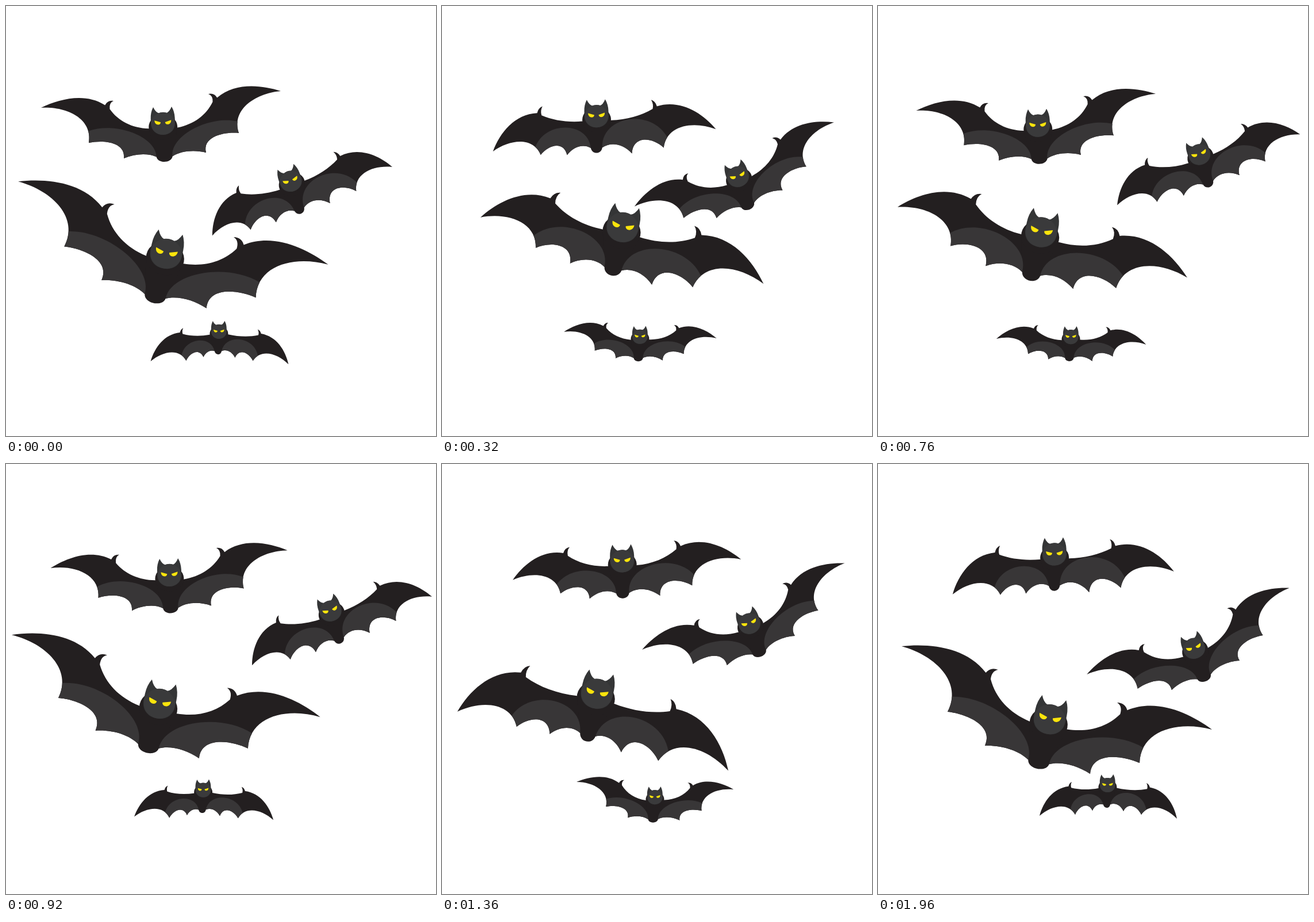
An HTML page with a canvas for the animation above (2000 ms loop, 748 by 748 pixels).

```html
<!DOCTYPE html>
<html lang="en">
<head>
<meta charset="utf-8">
<title>Bats</title>
<style>
  html, body { margin: 0; width: 100%; height: 100%; overflow: hidden; background: #fff; }
  canvas { display: block; }
</style>
</head>
<body>
<canvas id="stage" width="748" height="748"></canvas>
<script>
const ctx = document.getElementById('stage').getContext('2d');
const LOOP = 2000, STEP = 40;
const DARK = '#231f20', SKIN = '#383637', HEAD = '#343536', FACE = '#3a3a3b', EYE = '#fbe40c';
const TIMES = [0, 160, 520, 760, 1120, 1640, 1960];

// Wing joints are offsets from the bottom of the body: [wing tip, thumb, outer point, inner point].
// Each bat has a raised and a lowered pose, and a path with a bob that follows the beat.
const bats = [
  {
    size: 1, tilt: -2, period: 800, top: 0, bob: 24,
    x: [276, 268, 276, 281, 296, 328, 307], y: [271, 275, 277, 275, 247, 254, 244],
    head: [[-4, -95.5], [-1, -92.5]],
    left: [[[-215, -94], [-89, -106], [-132, -33], [-71, -6]], [[-176, 9], [-95, -78], [-93, 8], [-49, 5]]],
    right: [[[202, -123], [76, -118], [129, -50], [72, -16]], [[208, -31], [97, -89], [115, -4], [60, 3]]]
  },
  {
    size: 0.92, tilt: -20, period: 800, top: 460, bob: 20,
    x: [513, 517, 561, 577, 581, 532, 570], y: [380, 371.5, 341.6, 331.5, 334, 348, 380],
    head: [[-29.5, -82.5], [-26.5, -81.5]],
    left: [[[-213, -18], [-106, -67], [-122, 11], [-61, 15]], [[-150, 42], [-108, -48], [-85, 29], [-42, 15]]],
    right: [[[144, -172], [35, -129], [100, -85], [60, -38]], [[160, -75], [58, -106], [96, -36], [50, -17]]]
  },
  {
    size: 1.33, tilt: 12, period: 960, top: 40, bob: 35,
    x: [257, 277, 301, 264, 233, 280, 277], y: [517, 504.5, 477, 493, 514.5, 508, 530],
    head: [[29.5, -123.5], [25.5, -120]],
    left: [[[-236, -213], [-68, -172], [-156, -99], [-91, -40]], [[-222, -18], [-104, -123], [-114, -10], [-58, -7]]],
    right: [[[304, -68], [139, -115], [178, -10], [92, 9]], [[235, 76], [148, -65], [114, 43], [54, 21]]]
  },
  {
    size: 0.64, tilt: -1, period: 960, top: 520, bob: 20,
    x: [369, 358, 326, 333, 354, 382, 398], y: [625.6, 624.5, 625, 626.7, 623.5, 626.8, 618],
    head: [[3, -63], [1, -58]],
    left: [[[-135, -80], [-49, -77], [-85, -32], [-46, -10]], [[-117, 14], [-61, -45], [-55, 12], [-25, 5]]],
    right: [[[142, -66], [59, -72], [87, -24], [48, -5]], [[122, 19], [69, -43], [60, 12], [29, 6]]]
  }
];

const mix = (a, b, k) => a + (b - a) * k;
const mixPt = (a, b, k) => [mix(a[0], b[0], k), mix(a[1], b[1], k)];
const add = (a, b) => [a[0] + b[0], a[1] + b[1]];

// Smooth curve through the values at TIMES.
function track(v, t) {
  const last = TIMES.length - 1;
  const slope = (a, b) => (v[b] - v[a]) / (TIMES[b] - TIMES[a]);
  const tangent = i => {
    if (i === 0) return slope(0, 1);
    if (i === last) return slope(last - 1, last);
    const d0 = TIMES[i] - TIMES[i - 1], d1 = TIMES[i + 1] - TIMES[i];
    return (slope(i - 1, i) * d1 + slope(i, i + 1) * d0) / (d0 + d1);
  };
  let i = 0;
  while (i < last - 1 && t > TIMES[i + 1]) i++;
  const d = TIMES[i + 1] - TIMES[i], u = (t - TIMES[i]) / d, w = 1 - u;
  return v[i] * w * w * (1 + 2 * u) + v[i + 1] * u * u * (3 - 2 * u)
    + d * u * w * (tangent(i) * w - tangent(i + 1) * u);
}

// Cubic from p to q; its handles are given along and across the chord.
function bow(p, q, side, a1, b1, a2, b2) {
  const dx = q[0] - p[0], dy = q[1] - p[1];
  const at = (a, b) => [p[0] + dx * a + side * dy * b, p[1] + dy * a - side * dx * b];
  return [p, at(a1, b1), at(a2, b2), q];
}

// The part of a cubic after u.
function tail(c, u) {
  const ab = mixPt(c[0], c[1], u), bc = mixPt(c[1], c[2], u), cd = mixPt(c[2], c[3], u);
  const abc = mixPt(ab, bc, u), bcd = mixPt(bc, cd, u);
  return [mixPt(abc, bcd, u), bcd, cd, c[3]];
}

const trace = (...curves) => curves.forEach(c => ctx.bezierCurveTo(...c[1], ...c[2], ...c[3]));

function fill(color, draw) {
  ctx.fillStyle = color;
  ctx.beginPath();
  draw();
  ctx.closePath();
  ctx.fill();
}

function drawWing(poses, side, p, shoulder, hip, turn) {
  const [tip, thumb, outer, inner] = poses[0].map((pt, i) => mixPt(pt, poses[1][i], p));
  const near = (up, down) => {
    const o = mixPt(up, down, p);
    return add(thumb, turn([o[0] * side, o[1]]));
  };
  const rootIn = near([-7, 14], [-1.5, 16]), rootOut = near([-15, 7], [-9, 12]);
  const hookIn = near([-8, 3], [-4, 8]), hookOut = near([-10, -2], [-7, 3]);

  const sag = mix(0.16, 0.07, p);
  const arm = bow(shoulder, rootIn, side, 0.35, sag, 0.7, sag);
  const crest = bow(rootOut, tip, side, 0.3, -mix(0.21, 0.24, p), 0.7, -mix(0.13, 0.17, p));
  const sweep = bow(tip, outer, side, 0.35, 0.29, 0.82, 0.36);
  const scallop = bow(outer, inner, side, 0.3, mix(0.22, 0.42, p), 0.87, mix(0.42, 0.56, p));
  const b = mix(0.13, 0.27, p);
  const hem = bow(inner, hip, side, 0.35, b, 0.75, b);

  fill(DARK, () => {
    ctx.moveTo(...shoulder);
    trace(arm);
    ctx.quadraticCurveTo(...hookIn, ...thumb);
    ctx.quadraticCurveTo(...hookOut, ...rootOut);
    trace(crest, sweep, scallop, hem);
    ctx.lineTo(...mixPt(add(hip, turn([12 * side, 0])), add(shoulder, turn([20 * side, 0])), 0.5));
  });

  const edge = tail(sweep, 0.82);
  const arch = mix(0.26, 0.51, p);
  const dome = bow(hip, edge[0], side, mix(0.1, 0.05, p), -arch, mix(0.7, 0.85, p), -arch);
  return () => fill(SKIN, () => {
    ctx.moveTo(...edge[0]);
    trace(edge, scallop, hem, dome);
  });
}

function drawHead() {
  fill(DARK, () => ctx.ellipse(0, 35, 25, 22, 0, 0, 7));
  fill(HEAD, () => {
    ctx.moveTo(-16, 0);
    ctx.quadraticCurveTo(-12, 9, -7, 10.5);
    ctx.quadraticCurveTo(0, 8, 7, 10.5);
    ctx.quadraticCurveTo(12, 9, 16, 0);
    ctx.quadraticCurveTo(21, 9, 21, 20);
    ctx.lineTo(21, 28);
    ctx.bezierCurveTo(21, 41, 12, 48.5, 0, 48.5);
    ctx.bezierCurveTo(-12, 48.5, -21, 41, -21, 28);
    ctx.lineTo(-21, 20);
    ctx.quadraticCurveTo(-21, 9, -16, 0);
  });
  fill(FACE, () => ctx.ellipse(0, 29, 20.5, 19.5, 0, 0, 7));
  for (const s of [-1, 1]) {
    fill(EYE, () => {
      ctx.moveTo(14.5 * s, 23.3);
      ctx.lineTo(3.8 * s, 26.6);
      ctx.bezierCurveTo(4 * s, 32.5, 14.5 * s, 32.5, 14.5 * s, 23.3);
    });
  }
}

function drawBat(bat, t) {
  const beat = (1 - Math.cos((t - bat.top) / bat.period * 2 * Math.PI)) / 2;
  const p = Math.pow(beat, 1.2);
  const angle = bat.tilt * Math.PI / 180;
  const cos = Math.cos(angle) * bat.size, sin = Math.sin(angle) * bat.size;
  const turn = ([x, y]) => [x * cos - y * sin, x * sin + y * cos];

  ctx.save();
  ctx.translate(track(bat.x, t), track(bat.y, t) - bat.bob * p);

  const head = mixPt(bat.head[0], bat.head[1], p);
  const shoulder = s => add(head, turn([25 * s, 37]));
  const w = mix(14, 9.5, p);
  const hip = s => turn([w * s, -9]);

  const skins = [
    drawWing(bat.left, 1, p, shoulder(-1), hip(-1), turn),
    drawWing(bat.right, -1, p, shoulder(1), hip(1), turn)
  ];
  fill(DARK, () => {
    ctx.moveTo(...shoulder(-1));
    ctx.lineTo(...hip(-1));
    ctx.bezierCurveTo(...turn([2 - w, 3]), ...turn([w - 2, 3]), ...hip(1));
    ctx.lineTo(...shoulder(1));
  });
  skins.forEach(draw => draw());

  ctx.translate(...head);
  ctx.rotate(angle);
  ctx.scale(bat.size, bat.size);
  drawHead();
  ctx.restore();
}

const start = performance.now();

function render() {
  const elapsed = Math.max(0, performance.now() - start) % LOOP;
  const t = Math.floor(elapsed / STEP) * STEP;
  ctx.fillStyle = '#fff';
  ctx.fillRect(0, 0, 748, 748);
  bats.forEach(bat => drawBat(bat, t));
  requestAnimationFrame(render);
}
render();
</script>
</body>
</html>
```
